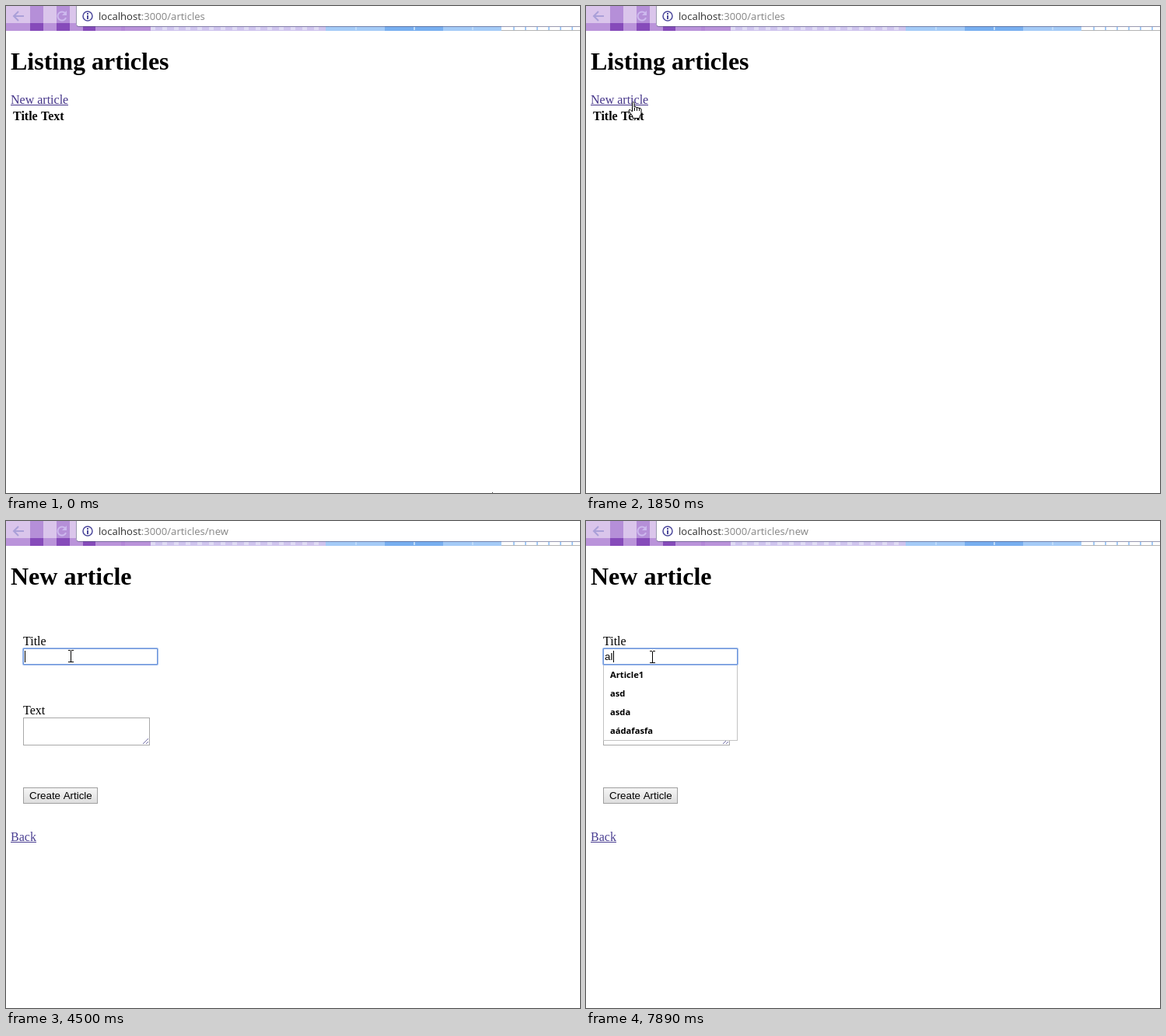
An HTML page with a canvas for the animation above (8000 ms loop, 738x627 px).

```html
<!DOCTYPE html>
<html lang="en">
<head>
<meta charset="utf-8">
<title>New article</title>
<style>
html, body { margin: 0; width: 100%; height: 100%; overflow: hidden; background: #fff; }
canvas { display: block; }
</style>
</head>
<body>
<canvas id="stage" width="738" height="627"></canvas>
<script>
const ctx = document.getElementById('stage').getContext('2d');
const LOOP = 8000;
const SERIF = '"Liberation Serif", serif';
const SANS = '"Liberation Sans", sans-serif';
const UI = '"Open Sans", sans-serif';

function rect(x, y, w, h, color) {
  ctx.fillStyle = color;
  ctx.fillRect(x, y, w, h);
}

function frame(x, y, w, h, color) {
  ctx.strokeStyle = color;
  ctx.lineWidth = 1;
  ctx.strokeRect(x + 0.5, y + 0.5, w - 1, h - 1);
}

function text(str, x, y, font, color = '#000') {
  ctx.font = font;
  ctx.fillStyle = color;
  ctx.fillText(str, x, y);
  return ctx.measureText(str).width;
}

function link(str, x, y, color) {
  const w = text(str, x, y, '16px ' + SERIF, color);
  rect(x, y + 1, Math.round(w), 1, color);
}

function poly(points, fill, stroke) {
  ctx.beginPath();
  points.forEach(([x, y]) => ctx.lineTo(x, y));
  ctx.closePath();
  ctx.fillStyle = fill;
  ctx.fill();
  ctx.strokeStyle = stroke;
  ctx.lineWidth = 1;
  ctx.stroke();
}

// Pointer keys: [time, x, y, shape], each held until the next one.
function glide(t0, t1, steps, [x0, y0], [x1, y1], ease, shape) {
  return Array.from({ length: steps }, (_, i) => {
    const p = ease((i + 1) / steps);
    const x = Math.round(x0 + (x1 - x0) * p);
    const y = Math.round(y0 + (y1 - y0) * p);
    return [t0 + (t1 - t0) * i / Math.max(1, steps - 1), x, y, shape(y)];
  });
}

const smooth = p => p * p * (3 - 2 * p);
const easeOut = p => 1 - (1 - p) ** 2;
const arrowOnly = () => 'arrow';
const overList = y => y < 130 ? 'hand' : y < 150 ? 'beam' : 'arrow';

const pointer = [
  [0, 625, 626, 'arrow'],
  [220, 625, 625, 'arrow'],
  ...glide(390, 770, 6, [625, 625], [333, 432], smooth, arrowOnly),
  ...glide(1000, 1389, 6, [333, 432], [65, 138], easeOut, overList),
  ...glide(1467, 1700, 4, [65, 138], [60, 124], easeOut, overList),
  [1850, 60, 123, 'hand'],
  [2780, 66, 128, 'hand'],
  [2860, 71, 134, 'beam'],
  [2940, 73, 137, 'beam'],
  [3010, 71, 135, 'arrow'],
  [3180, 79, 137, 'arrow'],
  [3500, 80, 144, 'arrow'],
  [3575, 80, 154, 'arrow'],
  [3650, 80, 161, 'arrow'],
  [3880, 83, 172, 'beam'],
  [3960, 84, 175, 'beam'],
  [4190, 79, 160, 'arrow'],
  [4260, 80, 162, 'arrow'],
  [4430, 83, 173, 'beam'],
  [4500, 83, 174, 'beam'],
  [4820, 84, 174, 'beam'],
  [4900, 85, 175, 'beam']
];

const typing = [
  [4500, '', 24], [5640, 't', 28], [6420, 'ti', 31], [6650, 'tit', 34],
  [7260, 'ti', 31], [7430, 't', 28], [7660, '', 24], [7890, 'al', 35]
];

const latest = (keys, t) => keys.filter(key => key[0] <= t).pop();

const cursors = {
  arrow() {
    poly([[0.5, 0.5], [0.5, 16.5], [4, 13], [6.5, 18.5], [8.5, 17.5],
      [6.2, 12], [11, 12]], '#fff', '#000');
  },
  beam() {
    rect(0, -7, 1, 15, '#000');
    for (const y of [-8, 7]) {
      rect(-3, y, 3, 1, '#000');
      rect(1, y, 3, 1, '#000');
    }
  },
  hand() {
    ctx.lineJoin = 'round';
    poly([[-0.5, 1.5], [0.5, 0.5], [2, 1.5], [2, 7], [4, 6.5], [5, 8],
      [7, 7.5], [8, 9], [10, 8.5], [11, 10], [11, 16], [9, 19], [9, 21.5],
      [0, 21.5], [0, 19], [-4.5, 13], [-5, 11], [-3, 10.5], [-0.5, 13]], '#fff', '#000');
    for (const x of [2, 5, 8]) rect(x, 8, 1, 4, '#000');
    ctx.lineJoin = 'miter';
  }
};

function drawThemeStrip() {
  rect(0, 0, 91, 22, '#dac5eb');
  rect(31, 0, 17, 22, '#b58fd8');
  rect(65, 0, 17, 22, '#b58fd8');
  rect(0, 22, 186, 10, '#ba93da');
  for (const x of [31, 65, 99]) rect(x, 22, x === 99 ? 16 : 17, 10, '#864bba');
  rect(148, 26, 5, 6, '#b487d8');
  rect(186, 26, 225, 6, '#cfc4ee');
  for (let x = 186; x < 411; x += 15) rect(x, 27, 6, 4, '#e0dcf4');
  rect(411, 26, 226, 6, '#a4cbf7');
  rect(487, 26, 75, 6, '#78aff0');
  for (const x of [449, 524, 599]) rect(x, 27, 2, 4, '#bfdcfa');
  rect(637, 26, 101, 5, '#fff');
  for (let x = 652; x < 738; x += 15) rect(x, 27, 2, 4, '#a4cbf7');
  rect(637, 31, 101, 1, '#b4b4b4');
}

function drawBrowser(path) {
  drawThemeStrip();
  ctx.fillStyle = '#fff';
  ctx.beginPath();
  ctx.roundRect(90, -4, 660, 30, 3);
  ctx.fill();
  ctx.strokeStyle = 'rgba(70, 70, 110, 0.55)';
  ctx.lineWidth = 1;
  ctx.beginPath();
  ctx.roundRect(90.5, -4, 660, 30.5, 3);
  ctx.stroke();

  ctx.strokeStyle = '#aaa0d8';
  ctx.lineWidth = 2;
  ctx.beginPath();
  ctx.moveTo(23, 13);
  ctx.lineTo(10, 13);
  ctx.moveTo(16, 7);
  ctx.lineTo(10, 13);
  ctx.lineTo(16, 19);
  ctx.stroke();

  ctx.strokeStyle = '#cdb9ee';
  ctx.beginPath();
  ctx.arc(72, 13, 5.5, 0.4, 5.5);
  ctx.stroke();
  ctx.beginPath();
  ctx.moveTo(78, 6);
  ctx.lineTo(78, 12);
  ctx.lineTo(72, 12);
  ctx.fillStyle = '#cdb9ee';
  ctx.fill();

  ctx.strokeStyle = '#4c489c';
  ctx.lineWidth = 1.5;
  ctx.beginPath();
  ctx.arc(105, 13, 6, 0, Math.PI * 2);
  ctx.stroke();
  rect(104, 9, 2, 2, '#4c489c');
  rect(104, 12, 2, 5, '#4c489c');

  const font = '13.1px ' + UI;
  const host = text('localhost', 119, 18, font, '#303030');
  text(':3000' + path, 119 + host, 18, font, '#858585');
}

function drawList(t) {
  const color = t < 2630 ? '#45358a' : t < 2780 ? '#ee0000' : '#552a80';
  text('Listing articles', 6, 82, 'bold 32px ' + SERIF);
  link('New article', 6, 126, color);
  text('Title', 9, 147, 'bold 16px ' + SERIF);
  text('Text', 45, 147, 'bold 16px ' + SERIF);
}

function drawTextarea() {
  frame(22, 253, 163, 36, '#a9a9a9');
  ctx.strokeStyle = '#7773a8';
  ctx.beginPath();
  ctx.moveTo(176, 287);
  ctx.lineTo(183, 280);
  ctx.moveTo(180, 287);
  ctx.lineTo(183, 284);
  ctx.stroke();
}

function drawButton() {
  const shade = ctx.createLinearGradient(0, 343, 0, 364);
  shade.addColorStop(0, '#f6f6f6');
  shade.addColorStop(1, '#dddddd');
  rect(22, 343, 96, 21, shade);
  frame(22, 343, 96, 21, '#a0a0a0');
  text('Create Article', 30, 358, '13.333px ' + SANS);
}

function drawSuggestions() {
  rect(22, 185, 173, 98, '#fff');
  frame(22, 185, 173, 98, '#c3c3c3');
  ['Article1', 'asd', 'asda', 'aádafasfa'].forEach((word, i) =>
    text(word, 31, 202 + 24 * i, 'bold 11.2px ' + UI));
}

function drawForm(t) {
  text('New article', 6, 82, 'bold 32px ' + SERIF);
  text('Title', 22, 160, '16px ' + SERIF);
  text('Text', 22, 249, '16px ' + SERIF);
  drawTextarea();
  drawButton();
  link('Back', 6, 412, '#4a3f92');

  frame(22, 164, 173, 21, '#a9a9a9');
  const field = latest(typing, t);
  if (!field) return;
  if (t >= 7890) drawSuggestions();
  ctx.beginPath();
  ctx.roundRect(21.5, 163.5, 174, 22, 1);
  ctx.strokeStyle = '#9dbaea';
  ctx.stroke();
  frame(22, 164, 173, 21, '#6f96dc');
  text(field[1], 24, 179, '13.333px ' + SANS);
  rect(field[2], 167, 1, 15, '#000');
}

function draw(t) {
  rect(0, 0, 738, 627, '#fff');
  drawBrowser(t < 2860 ? '/articles' : '/articles/new');
  if (t < 3010) drawList(t);
  else drawForm(t);

  const [, x, y, shape] = latest(pointer, t);
  ctx.save();
  ctx.translate(x, y);
  cursors[shape]();
  ctx.restore();
}

const start = performance.now();
function tick() {
  draw((performance.now() - start) % LOOP);
  requestAnimationFrame(tick);
}
tick();
</script>
</body>
</html>
```
